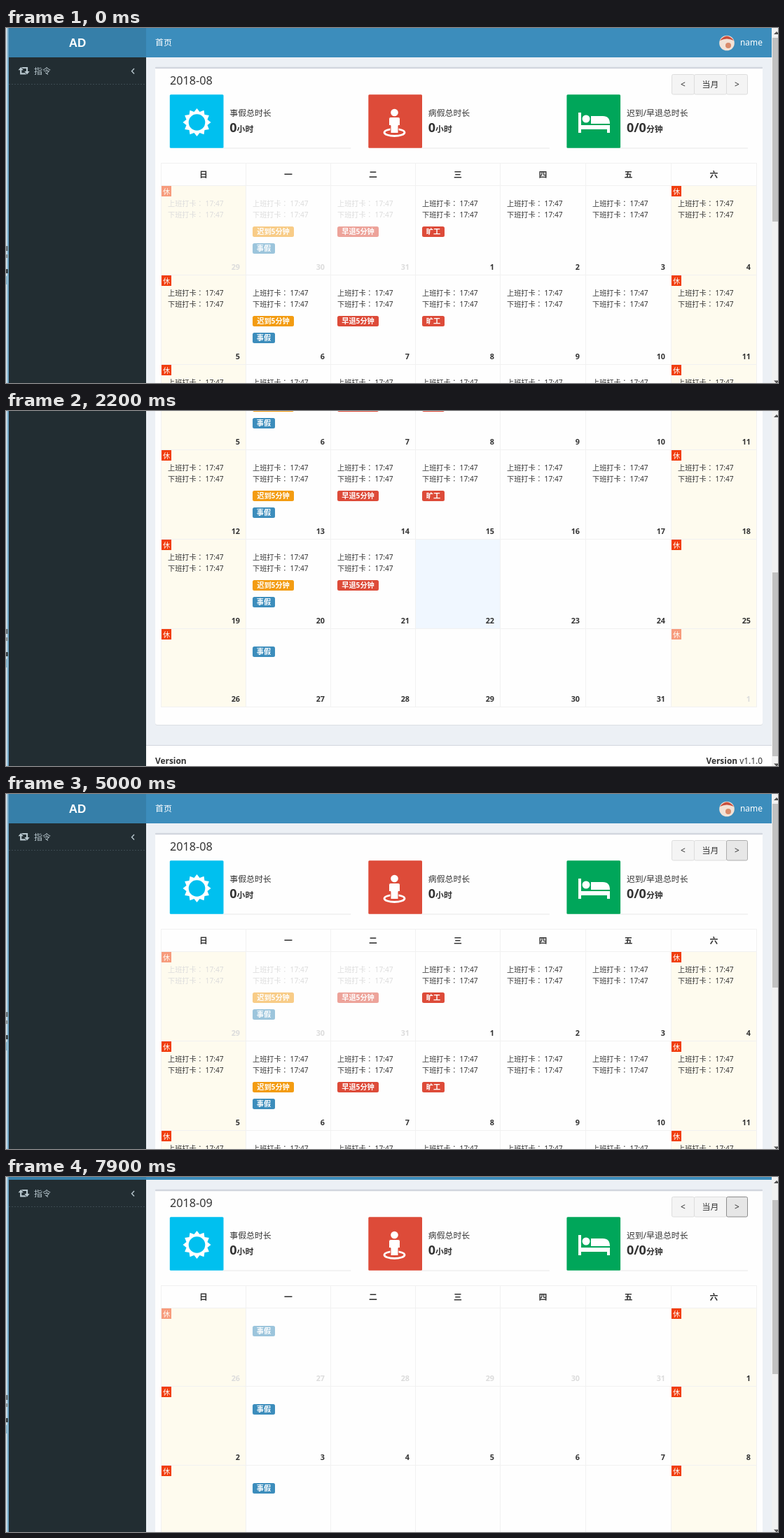
These frames come from a looping animation (1102 by 508 pixels, 8 s). An HTML page:

```html
<!DOCTYPE html>
<html lang="zh-CN">
<head>
<meta charset="utf-8">
<title>考勤日历</title>
<style>
  html, body { margin: 0; width: 100%; height: 100%; overflow: hidden; background: #ecf0f5; }
  svg { display: block; width: 1102px; height: 508px; }
  text { font-family: "Noto Sans", "Noto Sans CJK SC", sans-serif; font-size: 11.9px; fill: #333; white-space: pre; }
  .b { font-weight: 700; }
  .w { fill: #fff; }
  .s { font-size: 10.2px; }
  .mid { text-anchor: middle; }
  .end { text-anchor: end; }
  .colon { font-family: "Noto Sans CJK TC", "Noto Sans CJK", sans-serif; }
</style>
</head>
<body>
<svg id="stage" viewBox="0 0 1102 508"></svg>
<script>
const LOOP = 8000;
const TOP = 225.5, TALL = 128, SHORT = 112.34;
const DAYS = [...'日一二三四五六'];
const ORANGE = '#f39c12', RED = '#dd4b39', BLUE = '#3c8dbc', CREAM = '#fefbee';

const rect = (x, y, w, h, fill, more = '') =>
  `<rect x="${x}" y="${y}" width="${w}" height="${h}" fill="${fill}" ${more}/>`;
const text = (x, y, str, cls = '', more = '') =>
  `<text x="${x}" y="${y}" class="${cls}" ${more}>${str}</text>`;
const path = (d, fill, more = '') => `<path d="${d}" fill="${fill}" ${more}/>`;
const circle = (x, y, r, fill) => `<circle cx="${x}" cy="${y}" r="${r}" fill="${fill}"/>`;
const fade = (on, body) => on ? `<g opacity=".5">${body}</g>` : body;

// Left edge of a column; the last three are one pixel wider.
const colX = c => 221.5 + c * 121 + Math.max(0, c - 4);
const snap = y => Math.floor(y) + .5;

const tag = (x, y, str, color) => {
  const w = str.includes('5') ? 59 : 32;
  return rect(x, y, w, 15, color, 'rx="2.5"') + text(x + w / 2, y + 11.3, str, 'b w s mid');
};

function cell(c, y, h, d) {
  const x = colX(c), w = colX(c + 1) - x;
  const fill = d.today ? '#f0f7ff' : d.rest ? d.tint : 'none';
  let out = rect(x, y, w, h, fill, 'stroke="#f1f1f1"');
  if (d.rest)
    out += fade(d.other, rect(x + .5, y + .5, 14, 15, '#f13d0c') + text(x + 7.5, y + 12, '休', 'w s mid'));
  const pale = d.other ? 'style="fill:#dcdcdc"' : '';
  if (d.punched)
    ['上', '下'].forEach((half, i) => out += text(x + 9.5, y + 29.5 + i * 16,
      half + '班打卡<tspan class="colon" lang="zh-TW">：</tspan> 17:47', 's', pale));
  const first = y + (d.punched ? 58.5 : 25.5);
  out += fade(d.other, d.tags.map(([str, color], i) => tag(x + 9.5, first + i * 24, str, color)).join(''));
  return out + text(x + w - 8.5, y + h - 8, d.num, 'b end', `style="font-size:10.8px;${d.other ? 'fill:#dcdcdc' : ''}"`);
}

function august(r, c) {
  const punched = r < 3 || (r === 3 && c < 3);
  const full = [[], [['迟到5分钟', ORANGE], ['事假', BLUE]], [['早退5分钟', RED]], [['旷工', RED]]];
  const tags = punched ? full[c] || [] : r === 4 && c === 1 ? [['事假', BLUE]] : [];
  return { punched, tags, rest: c % 6 === 0, today: r === 3 && c === 3, tint: CREAM };
}

function september(r, c) {
  const last = r === 5;
  return { tags: !last && c === 1 ? [['事假', BLUE]] : [], rest: c % 6 === 0 || last, tint: last ? '#fff7f1' : CREAM };
}

function sun(x, y) {
  const points = Array.from({ length: 24 }, (_, i) => {
    const a = i * Math.PI / 12, r = i % 2 ? 15.5 : 20;
    return `${x + r * Math.sin(a)},${y - r * Math.cos(a)}`;
  });
  return `<polygon points="${points}" fill="#fff"/>` + circle(x, y, 11.8, '#00c0ef');
}

const person = () =>
  '<ellipse cx="554.5" cy="149.5" rx="14.5" ry="5" fill="none" stroke="#fff" stroke-width="2.8"/>' +
  circle(554.5, 121, 5.3, '#fff') +
  path('M549 127.5h11q2.5 0 2.5 2.5v9.5h-2.5v11h-11v-11h-2.5v-9.5q0-2.5 2.5-2.5z', '#fff', 'stroke="#dd4b39"');

const bed = () =>
  path('M817 121h4v18h41v11h-4v-5h-37v5h-4z', '#fff') + circle(828, 130, 5.5, '#fff') +
  path('M835 126h17q10 0 10 11h-27z', '#fff');

function infoBox(x, color, icon, label, value, unit) {
  return rect(x + 76, 171.5, 182.5, 1, '#e9e9e9') + rect(x, 95.2, 76.7, 76.6, color, 'rx="1.5"') + icon +
    text(x + 85.5, 126, label) +
    text(x + 85.5, 149, `<tspan style="font-size:18px">${value}</tspan>${unit}`, 'b');
}

const button = (x, w, str, more = '') =>
  rect(x + .5, 66.5, w, 28.5, '#f4f4f4', `stroke="#ddd" rx="2" ${more}`) + text(x + .5 + w / 2, 85, str, 'mid');

function header() {
  const arrow = 'M17.5 60.3l3.7-4.3 3.7 4.3h-2.6v4h5l1.8 2.2h-9v-6.2z';
  return rect(4, 0, 196, 42, '#367fa9') + rect(200, 0, 893, 42, BLUE) +
    text(102, 27, 'AD', 'b w mid', 'style="font:bold 17px Liberation Sans,sans-serif"') +
    text(213, 25, '首页', 'w') +
    circle(1029, 21.5, 10.8, '#f2e2d6') + path('M1019 18q10-13 20 0q-10-5-20 0z', '#c94f3d') +
    circle(1031, 25, 4, '#d98a6a') + text(1048, 25, 'name', 'w') +
    path(arrow, '#b8c7ce') + path(arrow, '#b8c7ce', 'transform="rotate(180 25.6 61.2)"') +
    text(40, 65.5, '指令', '', 'style="fill:#b8c7ce"') +
    path('M183 58l-3.5 3.7 3.5 3.7', 'none', 'stroke="#b8c7ce" stroke-width="1.4"') +
    path('M4 80.5h196', 'none', 'stroke="#3c4a51" stroke-dasharray="2 2"');
}

function page(id, title, first, before, length, rows, tall, info) {
  let y = TOP, cells = '';
  for (let r = 0; r < rows; r++) {
    const next = y + (r < tall ? TALL : SHORT);
    for (let c = 0; c < 7; c++) {
      const n = r * 7 + c - before;            // days since the 1st
      const other = n < 0 || n >= length;
      const num = n < 0 ? first + r * 7 + c : n % length + 1;
      cells += cell(c, snap(y), snap(next) - snap(y), { ...info(r, c), other, num });
    }
    y = next;
  }
  const end = snap(y), foot = end + 55.5;
  return `<g id="${id}">` +
    rect(213, 57, 867, end - 30.5, '#dcdfe4', 'rx="3"') + rect(213, 56, 867, end - 30.5, '#fefefe', 'rx="3"') +
    rect(213, 55.7, 867, 2.5, '#d2d6de', 'rx="1"') +
    text(234, 80.5, title, '', 'style="font-size:16.2px"') +
    button(950, 32, '&lt;') + button(982, 46, '当月') + button(1028, 30, '&gt;', 'class="next"') +
    infoBox(233.8, '#00c0ef', sun(272.5, 135), '事假总时长', '0', '小时') +
    infoBox(517.3, RED, person(), '病假总时长', '0', '小时') +
    infoBox(800.4, '#00a65a', bed(), '迟到/早退总时长', '0/0', '分钟') +
    DAYS.map((d, i) => rect(colX(i), 193.5, colX(i + 1) - colX(i), 32, 'none', 'stroke="#f1f1f1"') +
      text((colX(i) + colX(i + 1)) / 2, 213.5, d, 'b mid')).join('') +
    cells +
    rect(200, foot, 893, 90, '#fff') + rect(200, foot - 1, 893, 1, '#d2d6de') +
    text(213, foot + 26, 'Version', 'b') +
    text(1080, foot + 26, '<tspan class="b">Version</tspan> v1.1.0', 'end') + '</g>';
}

const edge = rect(0, 0, 4, 508, '#c9dce6') + rect(2, 0, 2, 508, '#6fa6c6') +
  rect(0, 312, 3, 7, '#6b777d') + rect(0, 324, 3, 5, '#8b979c') +
  rect(0, 345, 3, 6, '#3c464b') + rect(0, 355, 3, 12, '#8fb9cf');

const stage = document.getElementById('stage');
stage.innerHTML =
  rect(0, 0, 1102, 508, '#ecf0f5') + rect(4, 0, 196, 508, '#222d32') +
  '<g id="scroll">' + header() +
  page('aug', '2018-08', 29, 3, 31, 5, 4, august) +
  page('sep', '2018-09', 26, 6, 30, 6, 0, september) + '</g>' +
  edge + rect(1093, 0, 9, 508, '#f1f1f1') + rect(1094, 14, 8, 263, '#c1c1c1', 'id="thumb"') +
  path('M1096 9l4-4 4 4zM1096 504.5l4 4 4-4z', '#505050');

const [scroller, aug, sep, thumb] = ['scroll', 'aug', 'sep', 'thumb'].map(id => document.getElementById(id));
const nextButtons = stage.querySelectorAll('.next');

// [start ms, scroll offset at each following 100 ms tick]
const wheel = [
  [0, 0], [1100, 6, 60, 85], [1600, 89, 145, 170], [2000, 195, 330, 426], [2400, 431, 433],
  [3300, 410, 265, 178], [3800, 160, 49, 8], [4200, 6, 2, 0],
  [6100, 10, 110, 235, 345, 435, 483], [6900, 453, 350, 235, 120, 30, 0], [7900, 38]
];
const nextLook = [
  [0, '#f4f4f4', '#ddd'], [5000, '#e7e7e7', '#adadad'], [5300, '#d4d4d4', '#8c8c8c'], [5900, '#e6e6e6', '#8c8c8c']
];
const latest = (list, t) => list.filter(k => k[0] <= t).pop();

function scrollAt(t) {
  const [start, ...steps] = latest(wheel, t);
  return steps[Math.min(steps.length - 1, Math.floor((t - start) / 100))];
}

function draw(now) {
  const t = now % LOOP, y = scrollAt(t), later = t >= 5500;
  scroller.setAttribute('transform', `translate(0 ${-y})`);
  aug.style.display = later ? 'none' : '';
  sep.style.display = later ? '' : 'none';
  thumb.setAttribute('y', Math.round(14 + y * (later ? .487 : .509)));
  thumb.setAttribute('height', later ? 249 : 263);
  thumb.setAttribute('fill', t >= 200 && t < 300 ? '#a8a8a8' : '#c1c1c1');
  const [, fill, stroke] = latest(nextLook, t);
  nextButtons.forEach(b => { b.setAttribute('fill', fill); b.setAttribute('stroke', stroke); });
}

const begin = performance.now();
function tick() {
  draw(Math.max(0, performance.now() - begin));
  requestAnimationFrame(tick);
}
tick();
</script>
</body>
</html>
```
